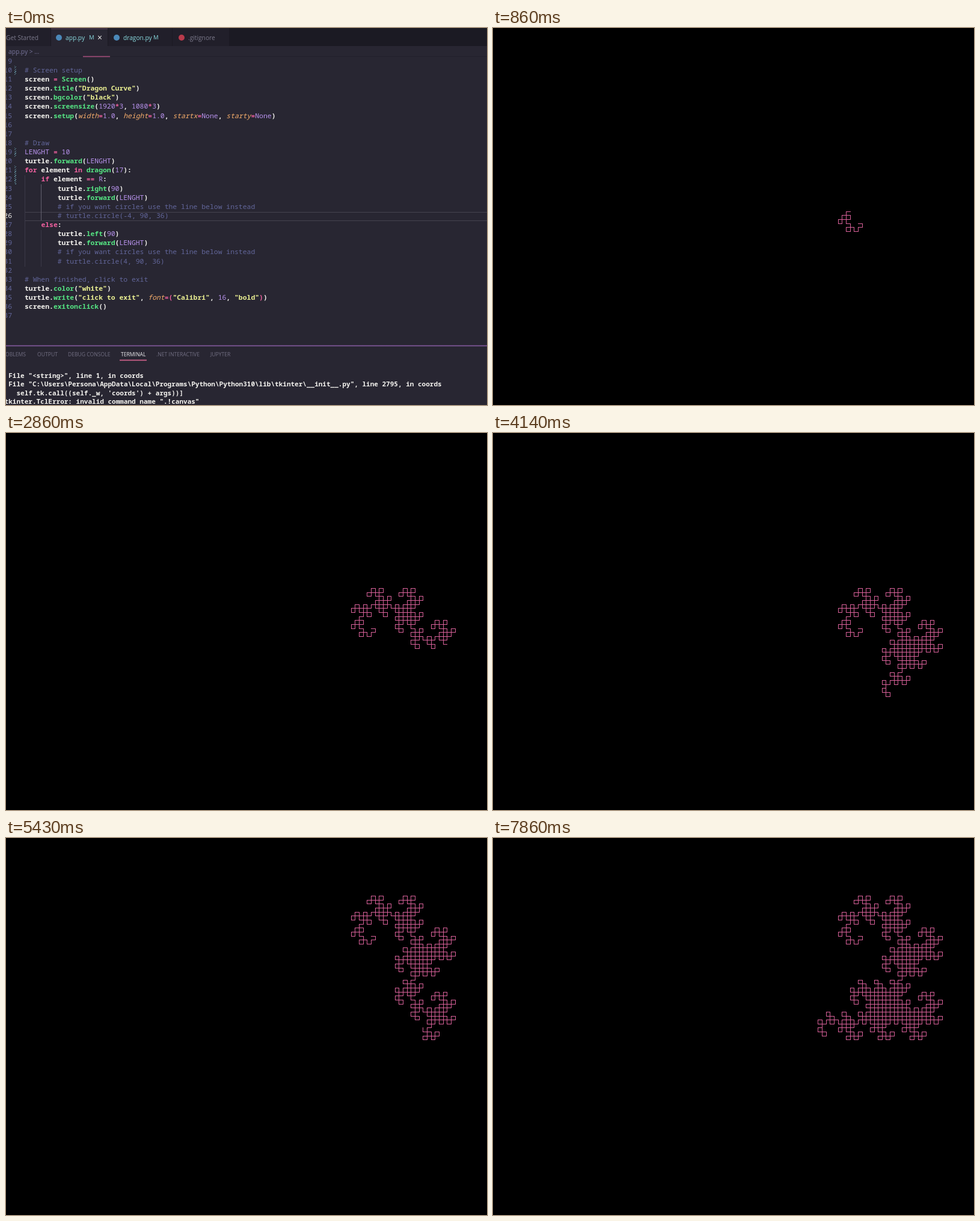
Animation of 800x627 px, one loop 8000 ms. Source, as an HTML page with a canvas:

```html
<!DOCTYPE html>
<html lang="en">
<head>
<meta charset="utf-8">
<title>Dragon curve</title>
<style>
  html, body { margin: 0; width: 100%; height: 100%; overflow: hidden; background: #000; }
  #stage { position: relative; width: 800px; height: 627px; overflow: hidden; }
  #stage * { box-sizing: border-box; }
  #editor, #plot { position: absolute; left: 0; top: 0; width: 800px; height: 627px; }
  #editor { background: #282632; font-family: "Open Sans", "Noto Sans", sans-serif; white-space: pre; }
  #editor div { position: absolute; }
  pre { position: absolute; margin: 0; font: 600 11.42px/15.12px "Noto Sans Mono", monospace; color: #f4f3ef; }
  u, s, b, i, em, q { font: inherit; text-decoration: none; }
  q::before, q::after { content: none; }
  u { color: #62669a; font-weight: 400; }
  s { color: #f0609f; }
  b { color: #55e583; }
  i { color: #b993ee; font-weight: 500; }
  em { color: #f5ad6b; font-style: italic; font-weight: 500; }
  q { color: #ebf092; }

  .bar { left: 0; top: 0; width: 800px; height: 30px; background: #1b1a23; }
  .tab { top: 0; height: 30px; background: #211f2a; border-right: 1px solid #1b1a23; }
  .tab.on { background: linear-gradient(#282632 1px, #553a52 1px 2px, #282632 2px); }
  .label { font-size: 10.2px; line-height: 16px; top: 8px; color: #7c7a8c; }
  .changed { color: #8adbe0; font-weight: 500; }
  .mark { font-size: 9.6px; }
  .dot { width: 10px; height: 10px; top: 11px; border-radius: 50%; background: #4b88b8; }
  .head { top: 537px; font-size: 8.6px; line-height: 12px; color: #726f83; }
  .hatch { left: 14px; width: 3px; height: 15px;
    background: repeating-linear-gradient(135deg, #5f8b98 0 1px, #282632 1px 2.5px); }
  .guide { width: 1px; background: #3b3947; }
  .soft { height: 3px; background: linear-gradient(transparent, currentColor, transparent); }
  #numbers { left: -20px; width: 30px; top: 46.8px; text-align: right; color: #62669a; font-weight: 400; }
  #numbers span { color: #f4f3ef; }
  #code { left: 31px; top: 46.8px; }
  #terminal { left: 0; top: 570.5px; width: 800px; height: 57px; overflow: hidden; }
  #output { left: -9px; top: 0; font-size: 11.03px; line-height: 14.6px; }
</style>
</head>
<body>
<div id="stage">
  <div id="editor">
    <div class="bar"></div>
    <div class="tab" style="left:0;width:75px"></div>
    <div class="tab on" style="left:75px;width:95px"></div>
    <div class="tab" style="left:170px;width:107px"></div>
    <div class="tab" style="left:277px;width:95px"></div>
    <div class="label" style="left:0">Get Started</div>
    <div class="dot" style="left:83px"></div>
    <div class="label changed" style="left:99px">app.py</div>
    <div class="label changed mark" style="left:138px">M</div>
    <div class="label" style="left:152px;color:#eee;font-size:14px">×</div>
    <div class="dot" style="left:179px"></div>
    <div class="label changed" style="left:195px">dragon.py</div>
    <div class="label changed mark" style="left:245px">M</div>
    <div class="dot" style="left:287px;background:#b83a4b"></div>
    <div class="label" style="left:303px">.gitignore</div>
    <div class="label" style="left:4px;top:31px;color:#77749a">app.py &gt; ...</div>
    <div style="left:0;top:47px;width:800px;height:1px;background:#22202b"></div>
    <div class="soft" style="left:128px;top:46px;width:45px;color:#a04c78"></div>

    <div style="left:31px;top:306px;width:780px;height:15px;border:1px solid #45424f"></div>
    <div class="hatch" style="top:63px"></div>
    <div class="hatch" style="top:199px"></div>
    <div class="hatch" style="top:229px;height:31px"></div>
    <div class="guide" style="left:31px;top:245px;height:152px"></div>
    <div class="guide" style="left:58px;top:260px;height:60px;background:#62606f"></div>
    <div class="guide" style="left:58px;top:336px;height:61px"></div>
    <pre id="numbers"></pre>
    <pre id="code">

<u># Screen setup</u>
screen <s>=</s> <b>Screen</b>()
screen.<b>title</b>(<q>"Dragon Curve"</q>)
screen.<b>bgcolor</b>(<q>"black"</q>)
screen.<b>screensize</b>(<i>1920</i><s>*</s><i>3</i>, <i>1080</i><s>*</s><i>3</i>)
screen.<b>setup</b>(<em>width</em><s>=</s><i>1.0</i>, <em>height</em><s>=</s><i>1.0</i>, <em>startx</em><s>=</s><i>None</i>, <em>starty</em><s>=</s><i>None</i>)


<u># Draw</u>
<i>LENGHT</i> <s>=</s> <i>10</i>
turtle.<b>forward</b>(<i>LENGHT</i>)
<s>for</s> element <s>in</s> <b>dragon</b>(<i>17</i>):
    <s>if</s> element <s>==</s> <i>R</i>:
        turtle.<b>right</b>(<i>90</i>)
        turtle.<b>forward</b>(<i>LENGHT</i>)
        <u># if you want circles use the line below instead</u>
        <u># turtle.circle(-4, 90, 36)</u>
    <s>else</s>:
        turtle.<b>left</b>(<i>90</i>)
        turtle.<b>forward</b>(<i>LENGHT</i>)
        <u># if you want circles use the line below instead</u>
        <u># turtle.circle(4, 90, 36)</u>

<u># When finished, click to exit</u>
turtle.<b>color</b>(<q>"white"</q>)
turtle.<b>write</b>(<q>"click to exit"</q>, <em>font</em><s>=(</s><q>"Calibri"</q>, <i>16</i>, <q>"bold"</q><s>)</s>)
screen.<b>exitonclick</b>()
</pre>

    <div class="soft" style="left:0;top:527px;width:800px;color:#82589c"></div>
    <div class="head" style="right:767px">PROBLEMS</div>
    <div class="head" style="left:52px">OUTPUT</div>
    <div class="head" style="left:103px">DEBUG CONSOLE</div>
    <div class="head" style="left:191px;color:#f0eff2;font-weight:500">TERMINAL</div>
    <div class="head" style="left:250px">.NET INTERACTIVE</div>
    <div class="head" style="left:340px">JUPYTER</div>
    <div class="soft" style="left:189px;top:551px;width:45px;color:#d2628c"></div>
    <div id="terminal"><pre id="output">  File "&lt;string&gt;", line 1, in coords
  File "C:\Users\Persona\AppData\Local\Programs\Python\Python310\lib\tkinter\__init__.py", line 2795, in coords
    self.tk.call((self._w, 'coords') + args))]
_tkinter.TclError: invalid command name ".!canvas"
(dragoncurve-gzDUZAoE-py3.10) PS D:\Documents\Python\Proyectos\DragonCurve&gt; &amp; <q>C:/Users/Persona/AppData/Local/pypoetry/Cach</q>
<q>curve-gzDUZAoE-py3.10/Scripts/python.exe</q> d:/Documents/Python/Proyectos/DragonCurve/app.py</pre></div>
  </div>
  <canvas id="plot" width="800" height="627"></canvas>
</div>
<script>
  const LOOP = 8000, STEP = 1000 / 7;
  const RUN = 2, OPEN = 6, SCROLL = 34;
  const UNIT = 6.65, START_X = 607.4, START_Y = 325, SCROLL_BY = 162;
  // [step, segments drawn]
  const progress = [[6, 27], [20, 285], [29, 450], [33, 519], [34, 520], [38, 590], [55, 898]];

  const byId = id => document.getElementById(id);
  const plot = byId('plot'), output = byId('output');
  const ctx = plot.getContext('2d');

  byId('numbers').innerHTML = Array.from({ length: 29 }, (_, k) => k + 9)
    .map(n => n === 26 ? '<span>26</span>' : n).join('\n');

  function segmentsAt(step) {
    const k = Math.max(1, progress.findIndex(p => p[0] >= step));
    const [s0, n0] = progress[k - 1], [s1, n1] = progress[k];
    return Math.round(n0 + (n1 - n0) * (step - s0) / (s1 - s0));
  }

  const turnsRight = n => !(((n & -n) << 1) & n);

  function drawCurve(count, lift) {
    const px = x => Math.floor(START_X + x * UNIT);
    const py = y => Math.floor(START_Y + y * UNIT) - lift;
    ctx.fillStyle = '#000';
    ctx.fillRect(0, 0, 800, 627);
    ctx.fillStyle = '#d9619a';
    let x = 0, y = 0, heading = 0;
    for (let n = 1; n <= count; n++) {
      const nx = x + [1, 0, -1, 0][heading];
      const ny = y + [0, 1, 0, -1][heading];
      const left = px(Math.min(x, nx)), top = py(Math.min(y, ny));
      ctx.fillRect(left, top, px(Math.max(x, nx)) - left + 1, py(Math.max(y, ny)) - top + 1);
      x = nx;
      y = ny;
      heading = (heading + (turnsRight(n) ? 1 : 3)) % 4;
    }
  }

  let shown = -1;
  function render(now) {
    const step = Math.min(55, Math.floor((now % LOOP + 5) / STEP));
    if (step !== shown) {
      shown = step;
      output.style.top = step < RUN ? '0' : '-29.2px';
      plot.style.display = step < OPEN ? 'none' : 'block';
      if (step >= OPEN) drawCurve(segmentsAt(step), step < SCROLL ? 0 : SCROLL_BY);
    }
  }

  const begin = performance.now();
  function tick() {
    render(performance.now() - begin);
    requestAnimationFrame(tick);
  }
  tick();
</script>
</body>
</html>
```
